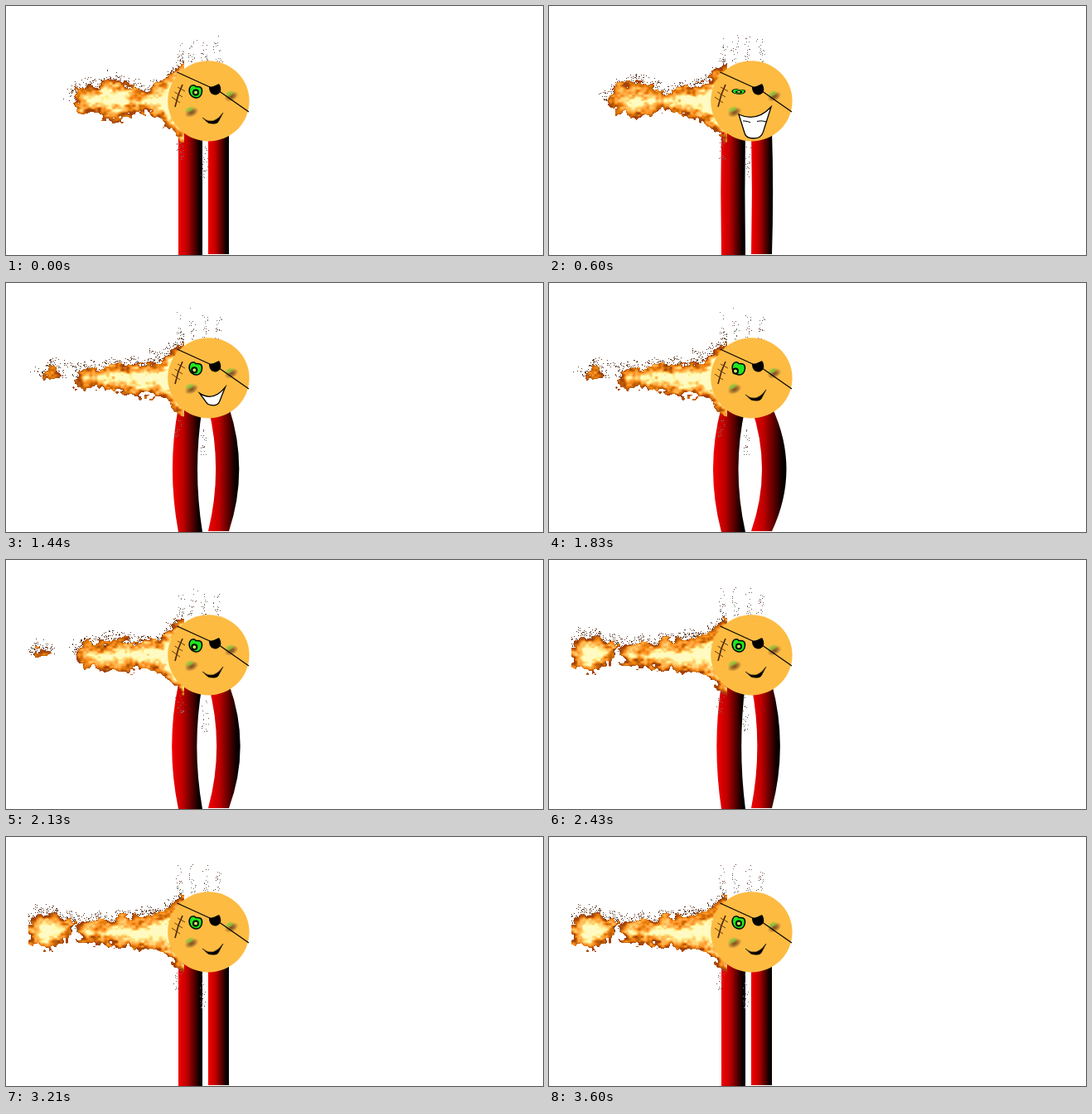
These frames come from a looping animation (648 px wide and 301 px high, 3.63 s). An HTML page with a canvas:

```html
<!DOCTYPE html>
<html>
<head>
<meta charset="utf-8">
<style>
html, body { margin: 0; width: 100%; height: 100%; overflow: hidden; background: #fff }
canvas { display: block }
</style>
</head>
<body>
<canvas id="stage" width="648" height="301"></canvas>
<script>
const ctx = document.getElementById('stage').getContext('2d');
const STEP = 30, STEPS = 121, FLAME_STEPS = 13;

const mix = (a, b, t) => a + (b - a) * t;
const clamp = v => Math.max(0, Math.min(1, v));
// Rises over [a, b], falls over [c, d].
const pulse = (t, a, b, c, d) => clamp((t - a) / (b - a)) * clamp((d - t) / (d - c));

function hash(x, y, seed = 0) {
  let h = Math.imul(x, 374761393) ^ Math.imul(y, 668265263) ^ Math.imul(seed, 974711);
  h = Math.imul(h ^ (h >>> 13), 1274126177);
  return ((h ^ (h >>> 16)) >>> 0) / 4294967296;
}

function noise(x, y, seed) {
  const ix = Math.floor(x), iy = Math.floor(y);
  const smooth = v => v * v * (3 - 2 * v), u = smooth(x - ix), v = smooth(y - iy);
  return mix(mix(hash(ix, iy, seed), hash(ix + 1, iy, seed), u),
             mix(hash(ix, iy + 1, seed), hash(ix + 1, iy + 1, seed), u), v);
}

// A steady jet behind the head throws two puffs per cycle; the second one burns out quickly.
function flameDepth(phase) {
  const age = phase % 6.5, second = phase >= 6.5;
  const size = second ? Math.max(0, 1 - age * .3) : 1 - (age / 6.5) ** 3;
  const puffX = 40 + 90 * Math.exp(-age / 1.4);
  const puffY = second ? 114 - 2 * age : 114;
  const rx = (second ? 36 : 31) * size, ry = 24 * size;
  return (x, y) => {
    const pinch = 5 * Math.exp(-(((x - puffX - 36) / 18) ** 2));
    const flare = Math.max(0, x - 185) * .85;
    const half = 15 + (x - 90) * .07 - pinch + flare;
    const jet = Math.min(half - Math.abs(y - 115), (x - 86) * .9);
    const puff = size && ry * (1 - Math.hypot((x - puffX) / rx, (y - puffY) / ry));
    return size ? Math.max(jet, puff) : jet;
  };
}

const heatColor = h => [
  mix(165, 255, clamp(h * 2.6)),
  mix(65, 250, clamp(h * 1.05 + .04)),
  mix(10, 195, clamp(h * 1.3 - .35))
];

function paintFlame(phase) {
  const layer = document.createElement('canvas');
  layer.width = 648;
  layer.height = 301;
  const c = layer.getContext('2d'), image = c.createImageData(188, 110);
  const depthAt = flameDepth(phase);
  for (let py = 0; py < 110; py++) for (let px = 0; px < 188; px++) {
    const x = px + 27, y = py + 55, flow = x + phase * 14;
    const ragged = noise(flow / 10, y / 7, 1) * 11 + noise(flow / 3.5, y / 3, 2) * 8 - 10;
    const depth = depthAt(x, y) + ragged;
    const speck = depth < 0 && depth > -11 && y < 115 &&
      hash(x, y, phase + 9) < .25 * (1 + depth / 11);
    if (depth < 0 && !speck) continue;
    const texture = noise(flow / 12, y / 5, 3) * .6 + noise(flow / 5, y / 3, 4) * .4 - .5;
    const rgb = speck ? [90, 55, 35] : heatColor(depth / 17 + texture * .9);
    image.data.set([...rgb, 255], (py * 188 + px) * 4);
  }
  c.putImageData(image, 27, 55);
  for (let i = 0; i < 4; i++) sparks(c, 210 + i * 15, 38 - 14 * hash(i, phase), 68, phase + i * 20);
  sparks(c, 208, 150, 186, phase + 80);
  sparks(c, 239, 162, 208, phase + 100);
  return layer;
}

// A thin dotted stream, denser towards its lower end.
function sparks(c, x, top, bottom, seed) {
  for (let i = 0; i < 20; i++) {
    const u = Math.sqrt(hash(i, 1, seed));
    const drift = Math.sin(u * 4 + seed) * 2 + (hash(i, 2, seed) - .5) * 8;
    c.fillStyle = i % 3 ? '#777' : '#7a4a3a';
    c.fillRect(Math.round(x + drift), Math.round(mix(top, bottom, u)), 1, 1);
  }
}

const flames = Array.from({ length: FLAME_STEPS }, (_, i) => paintFlame(i));

function draw(fill, stroke, width, build) {
  ctx.beginPath();
  build();
  if (fill) { ctx.fillStyle = fill; ctx.fill(); }
  if (stroke) { ctx.strokeStyle = stroke; ctx.lineWidth = width; ctx.stroke(); }
}

function line(color, width, ...points) {
  draw(null, color, width, () => points.forEach(([x, y]) => ctx.lineTo(x, y)));
}

function ellipse(x, y, rx, ry, fill, stroke, width) {
  draw(fill, stroke, width, () => ctx.ellipse(x, y, rx, ry, 0, 0, 7));
}

function leg(left, right, bottom, bendLeft, bendRight) {
  const shade = ctx.createLinearGradient(left + Math.min(0, bendLeft), 0, right + Math.max(0, bendRight), 0);
  shade.addColorStop(0, '#f40000');
  shade.addColorStop(.35, '#c00000');
  shade.addColorStop(.88, '#0c0000');
  shade.addColorStop(1, '#000');
  draw(shade, null, 0, () => {
    ctx.moveTo(left, 150);
    ctx.quadraticCurveTo(left + 2 * bendLeft, 225, left, bottom);
    ctx.lineTo(right, bottom);
    ctx.quadraticCurveTo(right + 2 * bendRight, 225, right, 150);
  });
}

function glow(x, y, rx, ry, rgb) {
  ctx.save();
  ctx.translate(x, y);
  ctx.rotate(-.45);
  ctx.scale(rx, ry);
  const shade = ctx.createRadialGradient(0, 0, 0, 0, 0, 1);
  shade.addColorStop(0, `rgba(${rgb},.95)`);
  shade.addColorStop(.4, `rgba(${rgb},.7)`);
  shade.addColorStop(1, `rgba(${rgb},0)`);
  ellipse(0, 0, 1, 1, shade);
  ctx.restore();
}

function cheek(x, y) {
  glow(x + 1, y + 1.5, 9, 5.5, '120,75,35');
  glow(x - 1.5, y - 2, 7, 3.5, '130,200,60');
}

function eye(open, look) {
  ctx.save();
  ctx.translate(229, 103.5);
  ctx.scale(1, open);
  draw('#1fe61f', '#000', 1.5, () => {
    ctx.moveTo(-7.5, -4);
    ctx.bezierCurveTo(-6, -9, -1, -8, 0, -6);
    ctx.bezierCurveTo(3, -6, 8, -7, 7.5, 0);
    ctx.bezierCurveTo(7, 5, 4, 8, 0, 7.5);
    ctx.bezierCurveTo(-6, 7, -9, 1, -7.5, -4);
  });
  ellipse(-4 * look, 1 + 2 * look, 3, 3, '#c8f060', '#000', 2);
  ctx.restore();
}

function mouth(k) {
  const grin = pulse(k, 10, 19, 42, 52), wide = pulse(k, 10, 19, 21, 34);
  const left = { x: mix(237, 229, grin), y: mix(135, 131, grin) };
  const right = { x: mix(262, 268, grin), y: mix(129, 122, grin) };
  const base = mix(142.3, 156, grin) + 4 * wide, middle = 250 - 3 * wide;
  const spread = mix(5, 7, grin) + 2 * wide;
  const side = (corner, sign) => [mix(corner.x, middle + sign * spread, .6), mix(corner.y, base, .6)];
  const [rx, ry] = side(right, 1), [lx, ly] = side(left, -1);
  const open = grin > .2;
  draw(open ? '#fff' : '#000', '#000', open ? 1.3 : .5, () => {
    ctx.moveTo(left.x, left.y);
    ctx.quadraticCurveTo(250, mix(146, 141, grin), right.x, right.y);
    ctx.quadraticCurveTo(rx, ry, (rx + middle + spread) / 2, (ry + base) / 2);
    ctx.quadraticCurveTo(middle + spread, base, middle, base);
    ctx.quadraticCurveTo(middle - spread, base, (lx + middle - spread) / 2, (ly + base) / 2);
    ctx.quadraticCurveTo(lx, ly, left.x, left.y);
    ctx.closePath();
  });
  if (grin < .8) return;
  const teeth = (from, to) => draw(null, '#000', 1, () => {
    for (let x = from; x <= to; x += 3) ctx.lineTo(x, 140.5 + 1.6 * Math.sin(x * 1.9));
  });
  teeth(234, 245);
  teeth(251, 263);
}

function head(k) {
  ellipse(244.4, 114.8, 49.2, 48.6, '#fdbb42');
  line('#4a2408', 1.6, [213, 95], [208, 107], [204, 122]);
  for (let i = 0; i < 3; i++) line('#6a3a10', 1, [207 - i * 3.5, 98 + i * 6], [216 - i * 3, 103 + i * 7]);
  cheek(223, 127);
  cheek(271, 108);
  eye(1 - .62 * pulse(k, 14, 19, 21, 26), pulse(k, 42, 56, 64, 76));
  line('#000', 1.2, [206.5, 80], [246, 98], [258, 103.5], [293, 128]);
  draw('#000', null, 0, () => {
    ctx.moveTo(245, 98);
    ctx.quadraticCurveTo(252, 97, 257, 94);
    ctx.quadraticCurveTo(260, 98, 259, 103);
    ctx.bezierCurveTo(256, 110, 245, 109, 245, 98);
  });
  mouth(k);
}

function frame(now) {
  const k = Math.floor(now / STEP) % STEPS;
  const bend = pulse(k, 17, 61, 61, 107);
  ctx.fillStyle = '#fff';
  ctx.fillRect(0, 0, 648, 301);
  leg(208, 237, 301, -10 * bend, -8.5 * bend);
  leg(244, 269, 300, 13 * bend, 17.5 * bend);
  ctx.drawImage(flames[k % FLAME_STEPS], 0, 0);
  head(k);
  requestAnimationFrame(frame);
}
requestAnimationFrame(frame);
</script>
</body>
</html>
```
